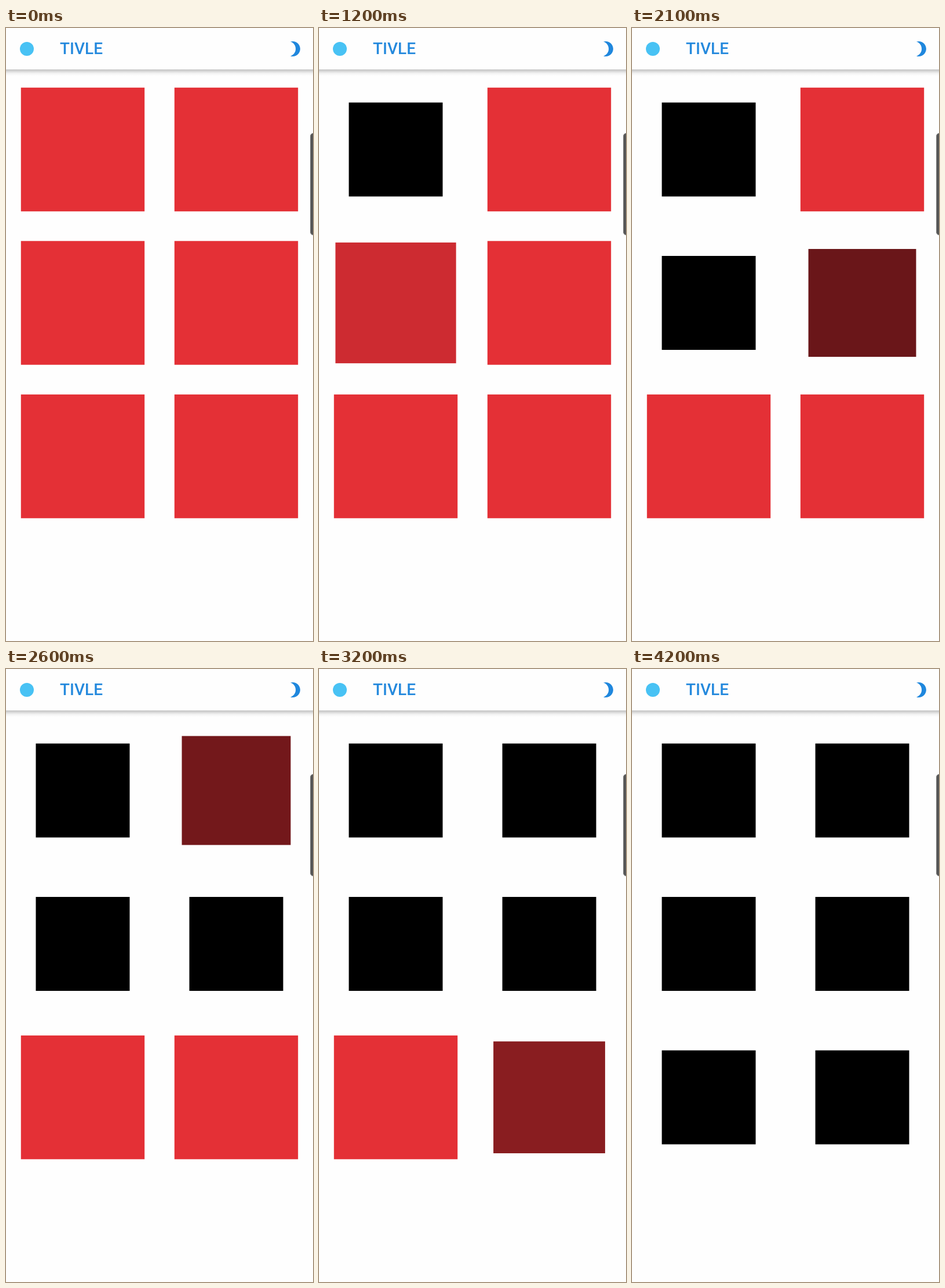
An HTML page for the animation above (5.9 s loop, 530x1057 px).

```html
<!DOCTYPE html>
<html lang="en">
<head>
<meta charset="utf-8">
<title>Tile grid</title>
<style>
  html, body { margin: 0; width: 100%; height: 100%; overflow: hidden; background: #fefefe; }
  svg { display: block; width: 100%; height: 100%; }
  text { font: 500 28px Roboto, Arial, sans-serif; }
</style>
</head>
<body>
<svg viewBox="0 0 530 1057" preserveAspectRatio="none">
  <defs>
    <linearGradient id="shade" x1="0" y1="0" x2="0" y2="1">
      <stop offset="0" stop-color="#000" stop-opacity=".25"/>
      <stop offset=".25" stop-color="#000" stop-opacity=".16"/>
      <stop offset=".6" stop-color="#000" stop-opacity=".045"/>
      <stop offset="1" stop-color="#000" stop-opacity="0"/>
    </linearGradient>
  </defs>
  <rect width="530" height="1057" fill="#fefefe"/>
  <rect y="71.5" width="530" height="11" fill="url(#shade)"/>
  <circle cx="36" cy="36" r="12" fill="#48c2f4"/>
  <text x="93" y="45" fill="#2489dd">TIVLE</text>
  <path transform="translate(483.2 20.4) scale(1.3)" fill="#1f87dd"
    d="M9 2c-1.05 0-2.05.16-3 .46 4.06 1.27 7 5.06 7 9.54s-2.94 8.27-7 9.54c.95.3 1.95.46 3 .46 5.52 0 10-4.48 10-10S14.52 2 9 2z"/>
  <g id="tiles"></g>
  <rect x="525.5" y="181.5" width="14" height="175.5" rx="5" fill="#555" stroke="#8c8c8c"/>
</svg>
<script>
const LOOP = 5900, STEP = 100, FADE = 500;
const BIG = 213.4, SMALL = 162;
const RED = [228, 48, 54];
const COLS = [132.5, 397.5], ROWS = [209.5, 474, 738.6];

// Each tile shrinks and darkens once it is tapped.
const taps = [
  { col: 0, row: 0, start: 270 },
  { col: 0, row: 1, start: 1150 },
  { col: 1, row: 1, start: 1833 },
  { col: 1, row: 0, start: 2352 },
  { col: 1, row: 2, start: 3000 },
  { col: 0, row: 2, start: 3567 }
];

const group = document.getElementById('tiles');
const tiles = taps.map(tap => {
  const node = document.createElementNS('http://www.w3.org/2000/svg', 'rect');
  group.append(node);
  return { ...tap, node };
});

function set(node, attrs) {
  for (const key in attrs) node.setAttribute(key, attrs[key]);
}

function draw(time) {
  for (const { col, row, start, node } of tiles) {
    const p = Math.min(1, Math.max(0, (time - start) / FADE));
    const size = BIG + (SMALL - BIG) * p;
    const rgb = RED.map(c => Math.round(c * (1 - p)));
    set(node, {
      x: COLS[col] - size / 2,
      y: ROWS[row] - size / 2,
      width: size,
      height: size,
      fill: `rgb(${rgb})`
    });
  }
}

const origin = performance.now();
function tick() {
  const time = (performance.now() - origin) % LOOP;
  draw(Math.floor(time / STEP) * STEP);
  requestAnimationFrame(tick);
}
draw(0);
requestAnimationFrame(tick);
</script>
</body>
</html>
```
